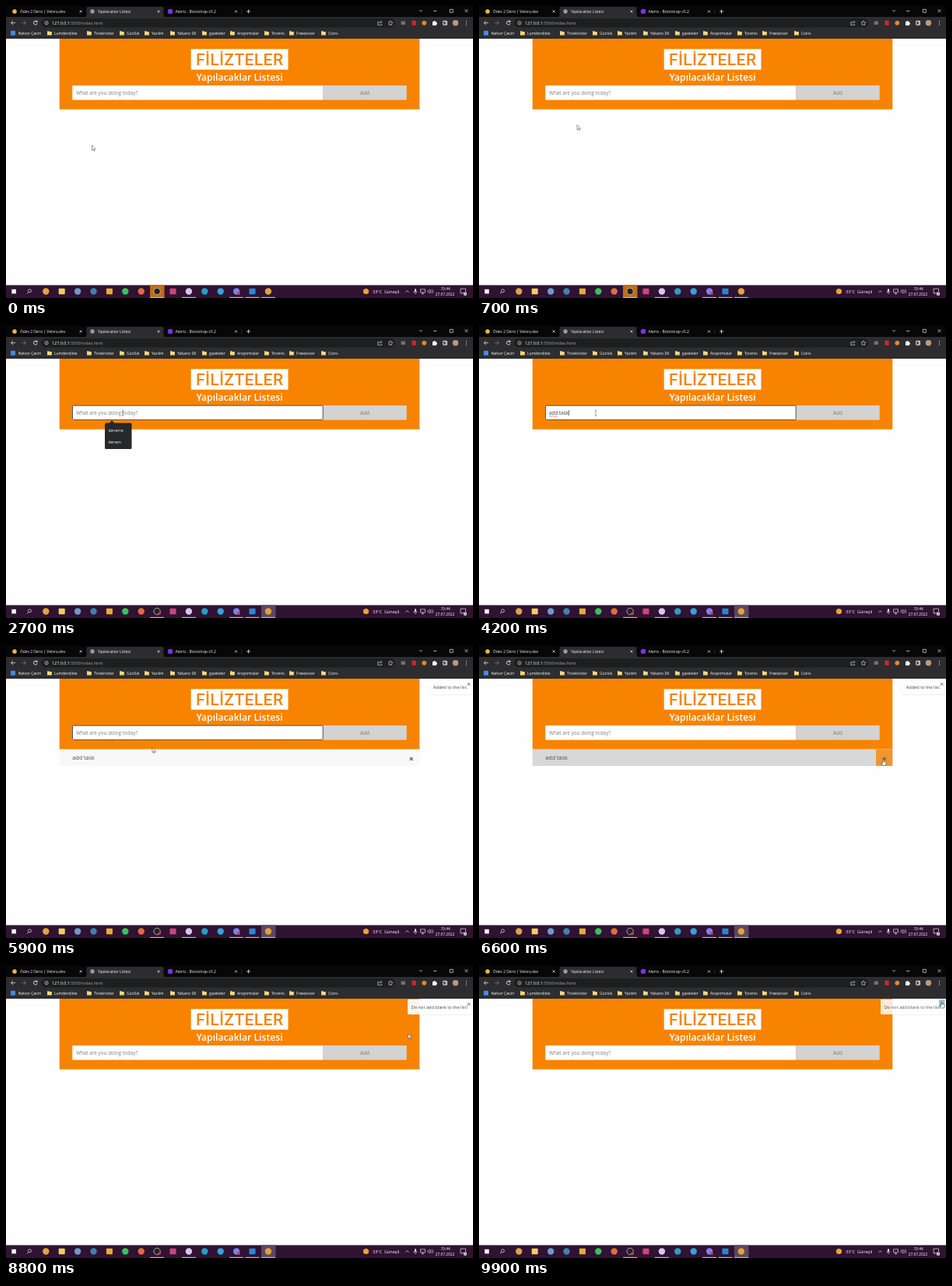
Animation of 600x375 px, one loop 10 s. Source, as an HTML page:

```html
<!DOCTYPE html>
<html lang="tr">
<head>
<meta charset="utf-8">
<title>Yapılacaklar Listesi</title>
<style>
  html, body { margin: 0; width: 100%; height: 100%; overflow: hidden; background: #fefefe; }
  svg { display: block; width: 100vw; height: 100vh; }
  text { font-family: "Open Sans", "Noto Sans", sans-serif; white-space: pre; }
</style>
</head>
<body>
<svg id="stage" viewBox="0 0 600 375"></svg>
<script>
const LOOP = 10000, ORANGE = '#f88300', LIGHT = '#e8e8ea';

const rect = (x, y, w, h, fill, more = '') =>
  `<rect x="${x}" y="${y}" width="${w}" height="${h}" fill="${fill}" ${more}/>`;
const dot = (x, y, r, fill, more = '') =>
  `<circle cx="${x}" cy="${y}" r="${r}" fill="${fill}" ${more}/>`;
const path = (d, stroke = LIGHT, width = .7, fill = 'none') =>
  `<path d="${d}" stroke="${stroke}" stroke-width="${width}" fill="${fill}"/>`;
const text = (x, y, size, fill, s, more = '') =>
  `<text x="${x}" y="${y}" font-size="${size}" fill="${fill}" ${more}>${s}</text>`;
const group = (id, body, more = '') => `<g id="${id}" ${more}>${body}</g>`;
const cross = (x, y, r, color = LIGHT, width = .7) =>
  path(`M${x - r} ${y - r}l${2 * r} ${2 * r}m0 ${-2 * r}l${-2 * r} ${2 * r}`, color, width);
const middle = 'text-anchor="middle"';

function browser() {
  let s = rect(0, 0, 600, 14, '#070708') + rect(0, 14, 600, 28, '#2d2d30')
    + path('M101 14Q103.5 14 103.5 11V3Q103.5 1 106 1H200Q202.5 1 202.5 3V11Q202.5 14 205 14Z', 'none', 0, '#2d2d30');
  // tabs
  s += dot(11, 7, 2.8, '#f5b63c') + dot(111, 7, 2.7, '#9a9b9f') + dot(211, 7, 3.3, '#7a2ff0');
  s += text(18, 8.9, 4.9, '#f2f2f3', 'Ödev 2 Dersi | Velora.dev')
    + text(118, 8.9, 4.85, '#f8f8f8', 'Yapılacaklar Listesi')
    + text(217.5, 8.9, 5.1, '#f2f2f3', 'Alerts - Bootstrap v5.2');
  s += [96, 196, 295.5].map(x => cross(x, 7, 1.5)).join('')
    + path('M302.5 4v6', '#48494c', .5) + path('M309 7h5m-2.5-2.5v5', LIGHT, .8);
  s += path('M531 5.2l2 2 2-2M549 6.5h4.5') + path('M570.3 4.3h4v4h-4z') + cross(591.5, 6.2, 2);
  // address row
  s += rect(45, 16, 455, 11.5, '#1d1e20', 'rx="5.7"');
  s += path('M12 21.7H6.5M9 19.2l-2.5 2.5 2.5 2.5', LIGHT, .8)
    + path('M20 21.7h5.5M23 19.2l2.5 2.5-2.5 2.5', '#77787b', .8)
    + path('M39.8 20.1a2.4 2.4 0 1 0 .4 2.2M40 18.6v1.9h-1.9', LIGHT, .9);
  s += dot(52, 21.7, 2.2, 'none', `stroke="${LIGHT}" stroke-width=".6"`) + path('M52 21.3v1.6M52 20.2v.5');
  s += text(59, 23.8, 5.4, '#fff', '127.0.0.1<tspan fill="#a6a7aa">:5500/index.html</tspan>');
  s += path('M479.5 20.5h-1.8v4h5v-1.5M479.5 22.8q.3-2.3 3-2.3M481.3 18.9l1.6 1.6-1.6 1.6', LIGHT, .6)
    + path('M494 18.8l.9 1.9 2.1.3-1.5 1.5.4 2.1-1.9-1-1.9 1 .4-2.1-1.5-1.5 2.1-.3z', LIGHT, .6);
  s += rect(507.5, 19.5, 5.5, 4.5, '#707277', 'rx="1"') + rect(521.5, 18.8, 5.2, 6, '#e0202c', 'rx="1"')
    + dot(537.3, 21.8, 2.9, '#e8872d')
    + path('M548 20h1.5a1 1 0 0 1 2 0h1.5v1.6a1 1 0 0 1 0 2v1.4h-5z', 'none', 0, '#fff')
    + path('M561.8 19.4h4.6v4.8h-4.6zM565 19.4v4.8', '#fff', .9)
    + dot(577.5, 21.8, 3.7, '#b99a80') + [19.5, 21.8, 24.1].map(y => dot(591.5, y, .6, LIGHT)).join('');
  // bookmarks
  s += rect(6, 31.7, 6, 6, '#4a88ea', 'rx="1"') + text(15.8, 36.8, 4.95, '#fff', 'Nelvor Çeviri');
  const marks = [[55, 'Lumderslikte'], [106, 'Tirvelnotlar'], [148, 'Günlük'], [180, 'Yazılım'], [213, 'Yabancı Dil'],
    [254, 'gazeteler'], [290, 'Araştırmalar'], [334, 'Torents'], [366, 'Freelancer'], [407, 'Coins']];
  for (const [x, name] of marks)
    s += path(`M${x - 2} 32.2h2.2l.8.8h2.8v4.4h-5.8z`, 'none', 0, '#f8d778') + text(x + 7, 36.8, 4.85, '#fff', name);
  return s;
}

function page() {
  const hint = 'What are you doing today?';
  return rect(0, 42, 600, 317, '#fefefe') + rect(68.7, 42, 462.6, 90.7, ORANGE)
    + rect(237.7, 55.3, 124.8, 26.4, '#fff')
    + text(300.2, 76, 21, ORANGE, 'FİLİZTELER', `${middle} style="font-family:Roboto,sans-serif;font-weight:500;letter-spacing:.4px"`)
    + text(300, 96.3, 12.2, '#fff', 'Yapılacaklar Listesi', `${middle} font-weight="600"`)
    + rect(85.3, 102, 322, 18.6, '#fff') + rect(407.3, 102, 107.4, 18.6, '#d3d3d4')
    + text(461, 113.8, 6.4, '#77787a', 'Add', middle)
    + group('focus', rect(85.5, 102.2, 321.7, 18.2, 'none', 'stroke="#2a3048" stroke-width=".8" rx=".8"'))
    + text(90, 113.8, 6.38, '#7b7e82', hint, 'id="hint"')
    + text(90, 113.8, 6.35, '#3c4043', '', 'id="typed"')
    + group('spell', path('M90 116q.9-1.2 1.8 0t1.8 0 1.8 0 1.8 0 1.8 0 1.8 0', '#e05048', .6))
    + rect(0, 108, .6, 7, '#222', 'id="caret"')
    + group('popup', path('M132.5 125l3.5-4 3.5 4z', 'none', 0, '#27282b')
      + rect(127, 124.5, 34.5, 33.5, '#27282b', 'rx="1.5"')
      + text(131.5, 135.8, 5, '#f2f2f2', 'deneme') + text(131.5, 150.8, 5, '#f2f2f2', 'denem'))
    + group('row', rect(68.7, 132.7, 462.6, 21.3, '#f8f8f8', 'id="rowBack"')
      + rect(510, 132.7, 21.3, 21.3, '#ef9630', 'id="closeBack"')
      + text(85.3, 146.3, 7.2, '#4a4a4c', 'add task') + cross(520.7, 145, 1.9, '#555', 1.2))
    + toast('added', 544, 'Added to the list.') + toast('blank', 516, 'Do not add blank to the list!');
}

const toast = (id, x, s) => group(id,
  rect(x - .3, 43, 599.2 - x, 20.2, '#000', 'opacity=".06" rx="1.5"')
  + rect(x, 42.7, 598.5 - x, 19.5, '#fff', 'fill-opacity=".92" rx="1"')
  + (id === 'blank' ? rect(591, 43, 7.5, 9.5, '#8cc5d6', 'id="closeFocus"') : '')
  + text(x + 4.7, 55.2, 5.62, '#3f4347', s) + cross(594.6, 49, 1.8, '#333', .7));

function taskbar() {
  let s = rect(0, 358.5, 600, 16.5, '#301233');
  s += rect(185, 358.5, 18.5, 16.5, '#c26a16', 'id="alert"') + rect(328, 358.5, 18.5, 16.5, '#5d4660', 'id="active"');
  s += rect(7.3, 363.8, 5.6, 5.6, '#f2f2f2')
    + dot(30.5, 365.8, 2, 'none', 'stroke="#eee" stroke-width=".7"') + path('M29 367.4l-2 2.1', '#eee', .8);
  const apps = ['#e3a23a', '#f5cd58', '#6c9cc8', '#3b82b4', '#e9ae2c', '#35c558', '#e06c37', '#202124',
    '#cf4474', '#d9c5ee', '#259fc4', '#30a5df', '#7783ee', '#2389d7', '#e3a23a'];
  apps.forEach((color, i) => {
    const x = 51.3 + i * 20.4;
    s += [1, 4, 8, 13].includes(i)
      ? rect(x - 4, 362.8, 8, 7.4, color, 'rx=".8"')
      : dot(x, 366.5, 4.2, color, i === 7 ? 'stroke="#ddd" stroke-width=".7"' : '');
    if ([7, 9, 12, 13, 14].includes(i)) s += rect(x - 9, 373.8, 18, 1.2, '#8bbce8');
  });
  s += dot(197, 369.3, 1.9, '#e62f38', 'id="record"') + dot(299, 369.3, 1.9, '#e62f38');
  s += dot(462.5, 366.5, 3.6, '#f5a12d') + text(471, 368.6, 5.5, '#fff', '33°C  Güneşli');
  s += path('M513.5 367.7l2-2 2 2', '#fff') + rect(525, 363.3, 2, 4, '#fff', 'rx="1"')
    + path('M524 366q0 2.6 2 2.6t2-2.6M526 368.6v1.3', '#fff', .5)
    + path('M532.5 363.8h6v4h-6zM535.5 367.8v1.8M533.8 369.7h3.4', '#fff', .6)
    + path('M542 365.5h1.2l1.7-1.6v5.2l-1.7-1.6H542zM546.3 364.8q1.3 1.7 0 3.4M547.7 363.8q2 2.7 0 5.4', '#fff', .5);
  s += text(564.5, 365.2, 4.8, '#fff', '10:44', middle) + text(564, 372.4, 4.8, '#fff', '27.07.2022', middle);
  s += path('M584 363h6.5v5.5h-4l-1.3 1.3v-1.3H584z', '#fff', .6) + dot(590, 369.8, 2.2, '#d7d7da')
    + text(590, 371.3, 3.8, '#222', '2', middle);
  return s;
}

const pointers = group('arrow', path('M0 0V6.5L1.5 5.1 2.5 7.3 3.5 6.9 2.5 4.8H4.6Z', '#333', .5, '#fff'))
  + group('beam', path('M-1.1-3.3H1.1M0-3.3V3.3M-1.1 3.3H1.1', '#333', .5))
  + group('hand', path('M-.6 0Q0-.7.6 0V2.8L3.2 3.5Q3.8 3.8 3.6 4.7L2.9 8H-.9L-2.9 5.1Q-2.6 4-1.6 4.6L-.6 5.4Z', '#222', .5, '#fff'));

document.getElementById('stage').innerHTML = browser() + page() + taskbar() + group('pointer', pointers);

const el = id => document.getElementById(id);
const show = (id, on) => { el(id).style.opacity = +on; };
const ramp = (t, from, to) => Math.min(1, Math.max(0, (t - from) / (to - from)));

// time, x, y of the pointer tip
const track = [[0, 110.5, 179], [400, 110.5, 179], [1100, 150, 112], [5500, 150, 112], [5900, 188, 130.5],
  [6500, 519.5, 145.5], [6900, 519.5, 145.5], [7300, 500, 188], [7800, 461, 116.5], [8400, 461, 116.5],
  [9300, 594.5, 46], [LOOP, 594.5, 46]];
const keys = [2900, 3200, 3400, 3500, 3700, 3800, 4000, 4100];
const sent = 4800;

function place(t) {
  const i = track.findIndex(p => p[0] > t);
  const [a, b] = [track[i - 1], track[i]];
  const k = ramp(t, a[0], b[0]), e = k * k * (3 - 2 * k);
  return [a[1] + (b[1] - a[1]) * e, a[2] + (b[2] - a[2]) * e];
}

function draw(t) {
  const [x, y] = place(t);
  const inside = (l, top, r, bottom) => x >= l && x < r && y >= top && y < bottom;
  const typed = t < sent ? 'add task'.slice(0, keys.filter(k => k <= t).length) : '';
  const focus = t >= 1200 && t < 6400;
  const listed = t >= sent && t < 6900;

  show('focus', focus);
  show('hint', !typed);
  el('typed').textContent = typed;
  show('spell', typed.length > 3);
  show('caret', focus && t % 1000 < 500);
  el('caret').setAttribute('x', 90 + (typed ? el('typed').getComputedTextLength() : 0));
  show('popup', t >= 1300 && t < keys[0]);

  show('row', listed);
  el('rowBack').setAttribute('fill', inside(69, 133, 531, 154) ? '#d9d8d9' : '#f8f8f8');
  show('closeBack', inside(510, 133, 531, 154));
  show('added', t < 8400 ? ramp(t, sent, sent + 200) : 0);
  show('blank', ramp(t, 8300, 8500) * (1 - .1 * ramp(t, 9700, 9900)));
  show('closeFocus', t >= 9600);
  show('alert', t < 1200);
  show('record', t >= 1200);
  show('active', t >= 1200);

  const beam = inside(85, 102, 407, 121);
  const hand = inside(407, 102, 515, 121) || (listed && inside(510, 133, 531, 154)) || (t > 8400 && inside(591, 43, 600, 53));
  show('beam', beam);
  show('hand', hand);
  show('arrow', !beam && !hand);
  el('pointer').setAttribute('transform', `translate(${x} ${y})`);
}

const start = performance.now();
function tick() {
  const t = (performance.now() - start) % LOOP;
  draw(Math.floor(t / 100) * 100);
  requestAnimationFrame(tick);
}
tick();
</script>
</body>
</html>
```
